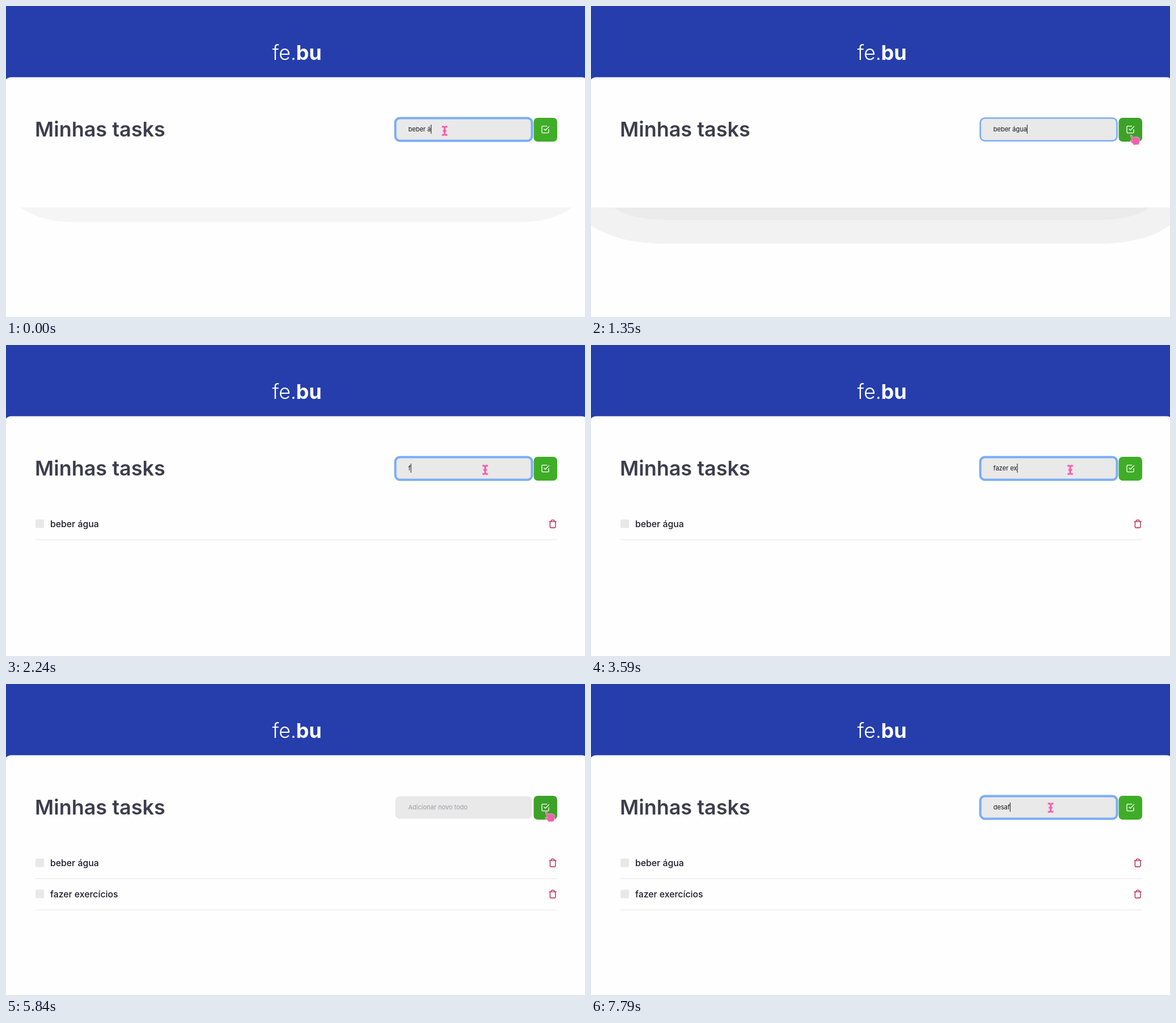
An HTML page for the animation above (8000 ms loop, 1021x548 px).

```html
<!DOCTYPE html>
<html lang="pt">
<head>
<meta charset="utf-8">
<style>
  html, body { margin: 0; width: 100%; height: 100%; overflow: hidden; background: #fefefe; }
  svg { display: block; width: 1021px; height: 548px; font-family: Inter, sans-serif; }
  text { white-space: pre; }
  .icon { fill: none; stroke-width: 2; stroke-linecap: round; stroke-linejoin: round; }
  .task text { font-size: 15.8px; font-weight: 500; fill: #1b1a2b; }
  #entry { font-size: 11px; }
  .cursor { fill: #f060ae; stroke: #f9c6e0; stroke-width: .7; }
</style>
</head>
<body>
<svg viewBox="0 0 1021 548">
  <defs>
    <g id="trash" class="icon" stroke="#b51f40">
      <path d="M3 6H21M19 6v14a2 2 0 0 1-2 2H7a2 2 0 0 1-2-2V6m3 0V4a2 2 0 0 1 2-2h4a2 2 0 0 1 2 2v2"/>
    </g>
  </defs>

  <rect width="1021" height="140" fill="#253eac"/>
  <g font-size="36" fill="#fff">
    <text x="512" y="95" text-anchor="end" font-weight="300">fe.</text>
    <text x="511.5" y="95" font-weight="700">bu</text>
  </g>
  <rect x="-3" y="125.5" width="1030" height="450" rx="12" fill="#fefefe"/>

  <path id="shadeRest" fill="#f5f5f5" d="M26 355C50 372 80 381 125 381H900C945 381 975 372 998 355Z"/>
  <g id="shadeHover">
    <path fill="#f2f2f2" d="M0 355V386Q45 419 135 419H890Q978 419 1021 386V355Z"/>
    <path fill="#ebebeb" d="M40 355C62 370 90 377 140 377H885C935 377 965 370 985 355Z"/>
  </g>

  <text x="51" y="230" font-size="36" font-weight="600" fill="#3d3d4d">Minhas tasks</text>

  <rect id="field" x="686.5" y="197.5" width="241" height="40" rx="8" fill="#e9e9e9" stroke="#7aadf5"/>
  <text id="entry" x="709.5" y="221"></text>
  <rect id="caret" y="209" width="1" height="16" fill="#111"/>

  <rect id="button" x="930.5" y="197" width="41.5" height="42" rx="7"/>
  <g class="icon" stroke="#fff" transform="translate(943 209.7) scale(.667)">
    <path d="M9 11l3 3L22 4M21 12v7a2 2 0 0 1-2 2H5a2 2 0 0 1-2-2V5a2 2 0 0 1 2-2h11"/>
  </g>

  <g id="tasks"></g>

  <path id="beam" class="cursor" d="M-5-9H-1.5L0-8 1.5-9H5V-5.5H1.8V-1.5H3.5V1.5H1.8V5.5H5V9H1.5L0 8-1.5 9H-5V5.5H-1.8V1.5H-3.5V-1.5H-1.8V-5.5H-5Z"/>
  <path id="hand" class="cursor" d="M-4 1Q-3-1-1 1L1 5 4 3.5 6 4 8 3.5 10 5 12 5.5 12.5 12 11 17 2 18 0 15-4 12Q-5 9-2 10L0 11Z"/>
</svg>
<script>
const LOOP = 8000;
const PLACEHOLDER = 'Adicionar novo todo';
const $ = id => document.getElementById(id);

// Time at which each entry text appears; an empty one shows the placeholder.
const typing = [
  [0, 'beber á'], [150, 'beber ág'], [300, 'beber águ'], [450, 'beber água'], [1490, ''],
  [2240, 'f'], [2390, 'fa'], [2690, 'faz'], [2840, 'faze'], [2990, 'fazer '],
  [3290, 'fazer e'], [3590, 'fazer ex'], [3890, 'fazer exe'], [4040, 'fazer exerc'],
  [4340, 'fazer exercí'], [4490, 'fazer exercíci'], [4640, 'fazer exercício'],
  [5090, 'fazer exercícios'], [5840, ''],
  [6740, 'd'], [7040, 'de'], [7190, 'des'], [7640, 'desa'], [7790, 'desaf']
];

// Time, x, y of the mouse.
const mouse = [
  [0, 773.5, 220], [900, 800, 219], [1050, 890, 220], [1200, 955, 225], [1350, 955, 227],
  [1640, 945, 225], [1790, 880, 221], [1940, 845, 220],
  [5390, 911, 214], [5540, 950, 222], [5690, 955, 225],
  [5990, 935, 222], [6140, 850, 219], [6290, 810.5, 218]
];

// Time and width of the focus ring.
const ring = [[0, 4], [1350, 2.7], [1490, 0], [1940, 4], [5690, 2.7], [5840, 0], [6290, 4]];

const tasks = [['beber água', 1490, 315], ['fazer exercícios', 5840, 370]].map(([label, start, y]) => {
  $('tasks').insertAdjacentHTML('beforeend', `<g class="task">
    <rect x="52" y="${y - 7.5}" width="15" height="15" rx="2" fill="#e8e8e8"/>
    <text x="78" y="${y + 6}">${label}</text>
    <use href="#trash" transform="translate(956 ${y - 8}) scale(.68)"/>
    <rect x="52" y="${y + 27.5}" width="920" height="1" fill="#e6e6e6"/></g>`);
  return { node: $('tasks').lastElementChild, start };
});

const at = (steps, t) => steps.findLast(step => step[0] <= t);
const show = (node, on) => { node.style.display = on ? '' : 'none'; };

function draw(t) {
  const text = at(typing, t)[1];
  const [, x, y] = at(mouse, t);
  const focus = at(ring, t)[1];
  const hover = x > 930;
  const entry = $('entry');

  entry.textContent = text || PLACEHOLDER;
  entry.setAttribute('fill', text ? '#15151c' : '#9b9ba3');
  $('caret').setAttribute('x', 709.5 + (text ? entry.getComputedTextLength() : 0));
  show($('caret'), focus);
  $('field').setAttribute('stroke-width', focus);
  $('button').setAttribute('fill', hover ? '#3ca227' : '#3fad27');

  for (const task of tasks) show(task.node, t >= task.start);
  show($('shadeRest'), t < 1200);
  show($('shadeHover'), t >= 1200 && t < 1490);

  for (const [id, on] of [['beam', !hover], ['hand', hover]]) {
    show($(id), on);
    $(id).setAttribute('transform', `translate(${x} ${y})`);
  }
}

function tick() {
  draw(performance.now() % LOOP);
  requestAnimationFrame(tick);
}
tick();
</script>
</body>
</html>
```
